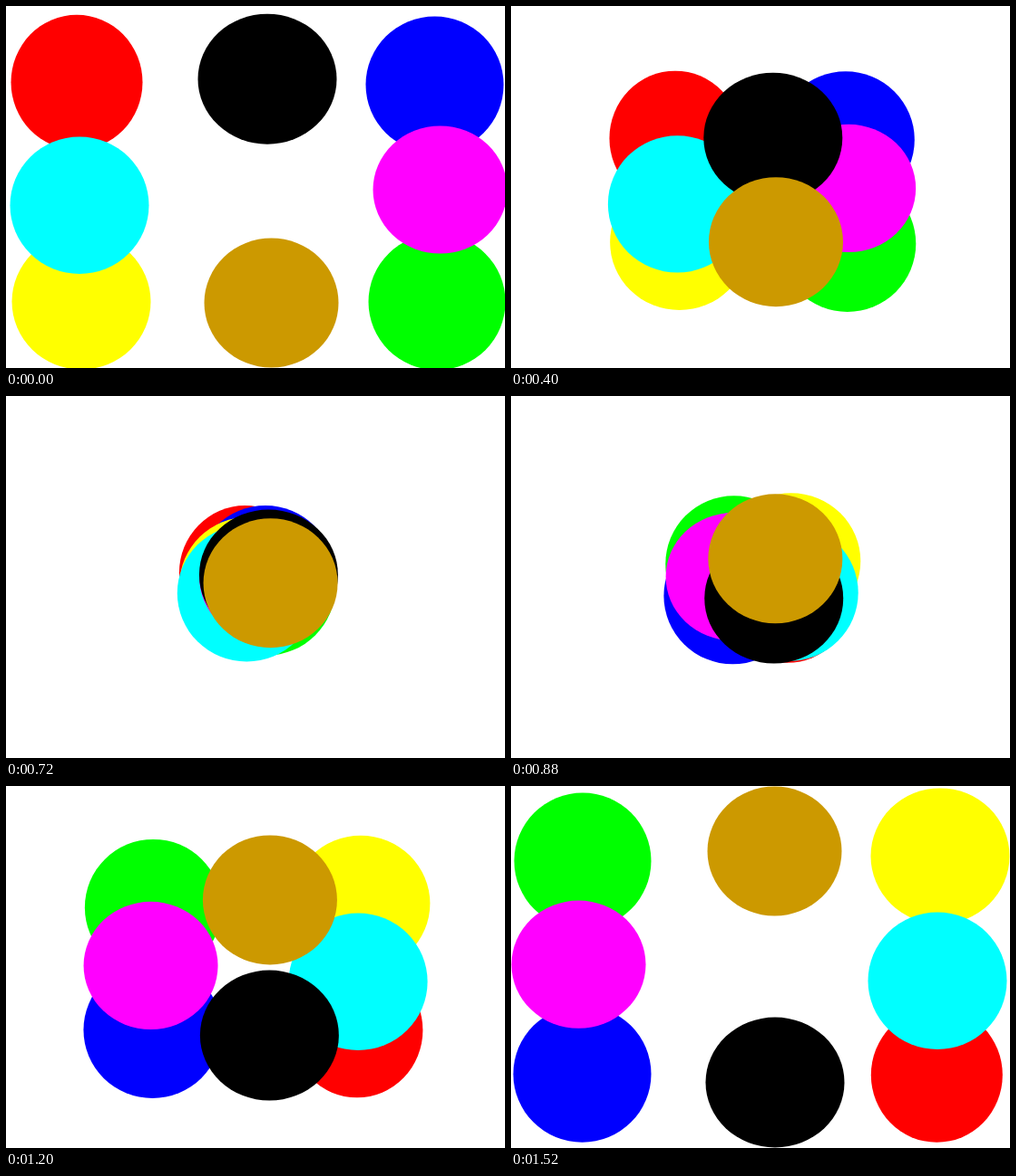
Recreate the animation shown at these times as an HTML page with a canvas. Size 550x400 px, loop 1.6 s.

```html
<!DOCTYPE html>
<html lang="en">
<head>
<meta charset="utf-8">
<title>Crossing discs</title>
<style>
  html, body { margin: 0; width: 100%; height: 100%; overflow: hidden; background: #fff; }
  canvas { display: block; }
</style>
</head>
<body>
<canvas id="stage" width="550" height="400"></canvas>
<script>
const ctx = document.getElementById('stage').getContext('2d');
const STEP_MS = 80;
const STEPS = 20;

// Back to front: colour, radii, start centre, end centre.
const discs = [
  { color: '#f00', r: [72.5, 74.5], from: [78, 84.3], to: [469.3, 319.3] },
  { color: '#00f', r: [76, 75.5], from: [472.5, 87], to: [78.5, 318.2] },
  { color: '#ff0', r: [76.5, 75], from: [83, 326.6], to: [473, 77.4] },
  { color: '#0f0', r: [75.5, 75.3], from: [475, 326.9], to: [79, 82.8] },
  { color: '#0ff', r: [76.5, 75.7], from: [81, 220.2], to: [470, 215.2] },
  { color: '#f0f', r: [74, 70.6], from: [478.5, 203], to: [74.5, 197.2] },
  { color: '#000', r: [76.5, 72], from: [288, 80.7], to: [291, 327.5] },
  { color: '#c90', r: [74, 71.5], from: [292.5, 328], to: [290.5, 72] },
];

const mix = (a, b, t) => a + (b - a) * t;

function drawDisc({ color, r, from, to }, t) {
  ctx.fillStyle = color;
  ctx.beginPath();
  ctx.ellipse(mix(from[0], to[0], t), mix(from[1], to[1], t), r[0], r[1], 0, 0, 2 * Math.PI);
  ctx.fill();
}

function draw(ms) {
  const step = Math.floor(ms / STEP_MS) % STEPS;
  const t = step / (STEPS - 1);
  ctx.fillStyle = '#fff';
  ctx.fillRect(0, 0, 550, 400);
  discs.forEach(disc => drawDisc(disc, t));
}

const start = performance.now();
function tick() {
  draw(performance.now() - start);
  requestAnimationFrame(tick);
}
tick();
</script>
</body>
</html>
```
